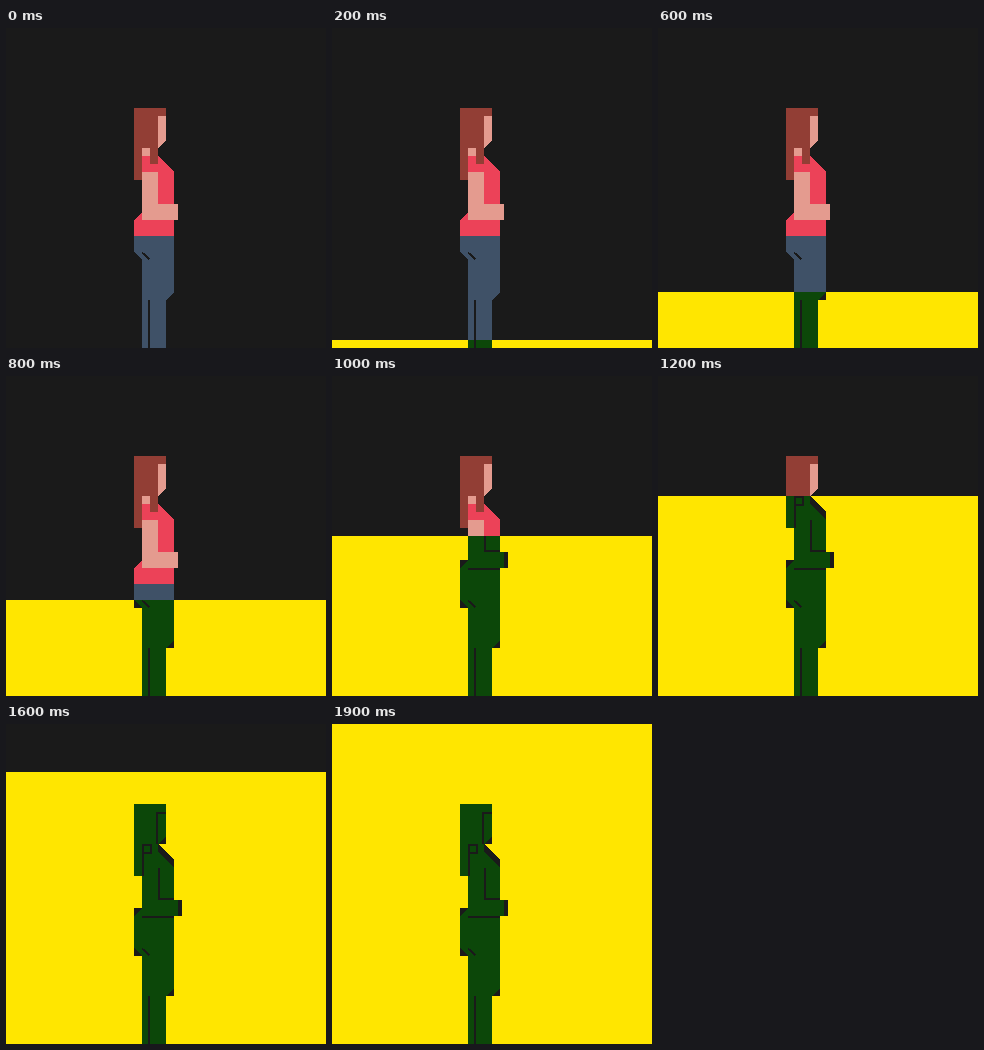
Animation, 320 px wide and 320 px high, one loop 2000 ms. Source, as an HTML page:

```html
<!DOCTYPE html>
<html lang="en">
<head>
<meta charset="utf-8">
<title>Rising colour</title>
<style>
html, body { margin: 0; width: 100%; height: 100%; overflow: hidden; background: #1a1a1a; }
svg { display: block; width: 100vw; height: 100vh; }
</style>
</head>
<body>
<svg viewBox="0 0 320 320" shape-rendering="crispEdges">
  <defs>
    <clipPath id="flood"><rect id="level" y="320" width="320" height="320"/></clipPath>
    <path id="seams" d="M136 224.5L143.5 231.5M143 272V320" fill="none" stroke="#1a1a1a" stroke-width="2"/>
  </defs>
  <rect width="320" height="320" fill="#1a1a1a"/>

  <path fill="#ec4258" d="M136 128H152L168 144V208H128V192L136 184Z"/>
  <path fill="#3f5167" d="M128 208H168V264L160 272V320H136V232L128 224Z"/>
  <path fill="#923e35" d="M128 80H160V88H152V136H144V120H136V152H128Z"/>
  <path fill="#e49b8f" d="M152 88H160V112L152 120ZM136 120H144V128H136ZM136 144H152V176H172V192H136Z"/>
  <use href="#seams"/>

  <g clip-path="url(#flood)">
    <rect width="320" height="320" fill="#ffe600"/>
    <path fill="#0c4709" d="M128 80H160V120H152L168 136V176H176V192H168V272H160V320H136V232H128V184H136V152H128Z"/>
    <path fill="#1a1a1a" d="M160 112V120H152ZM152 120L168 136V144L152 128ZM172 176H176V192H172ZM128 184H136L128 192ZM128 224L136 232H128ZM168 264V272H160Z"/>
    <path fill="none" stroke="#1a1a1a" stroke-width="2" d="M160 89H151V120M137 152V121H145V129H137M153 144V175H168M136 193H168"/>
    <use href="#seams"/>
  </g>
</svg>
<script>
const level = document.getElementById('level');
const STEP = 100;
const edges = [
  320, 316, 312, 304, 296, 288, 264, 248, 224, 192,
  160, 136, 120, 104, 88, 64, 48, 32, 16, 0
];
const start = performance.now();

function draw(now) {
  const step = Math.floor(Math.max(0, now - start) / STEP) % edges.length;
  level.setAttribute('y', edges[step]);
  requestAnimationFrame(draw);
}
draw(start);
</script>
</body>
</html>
```
